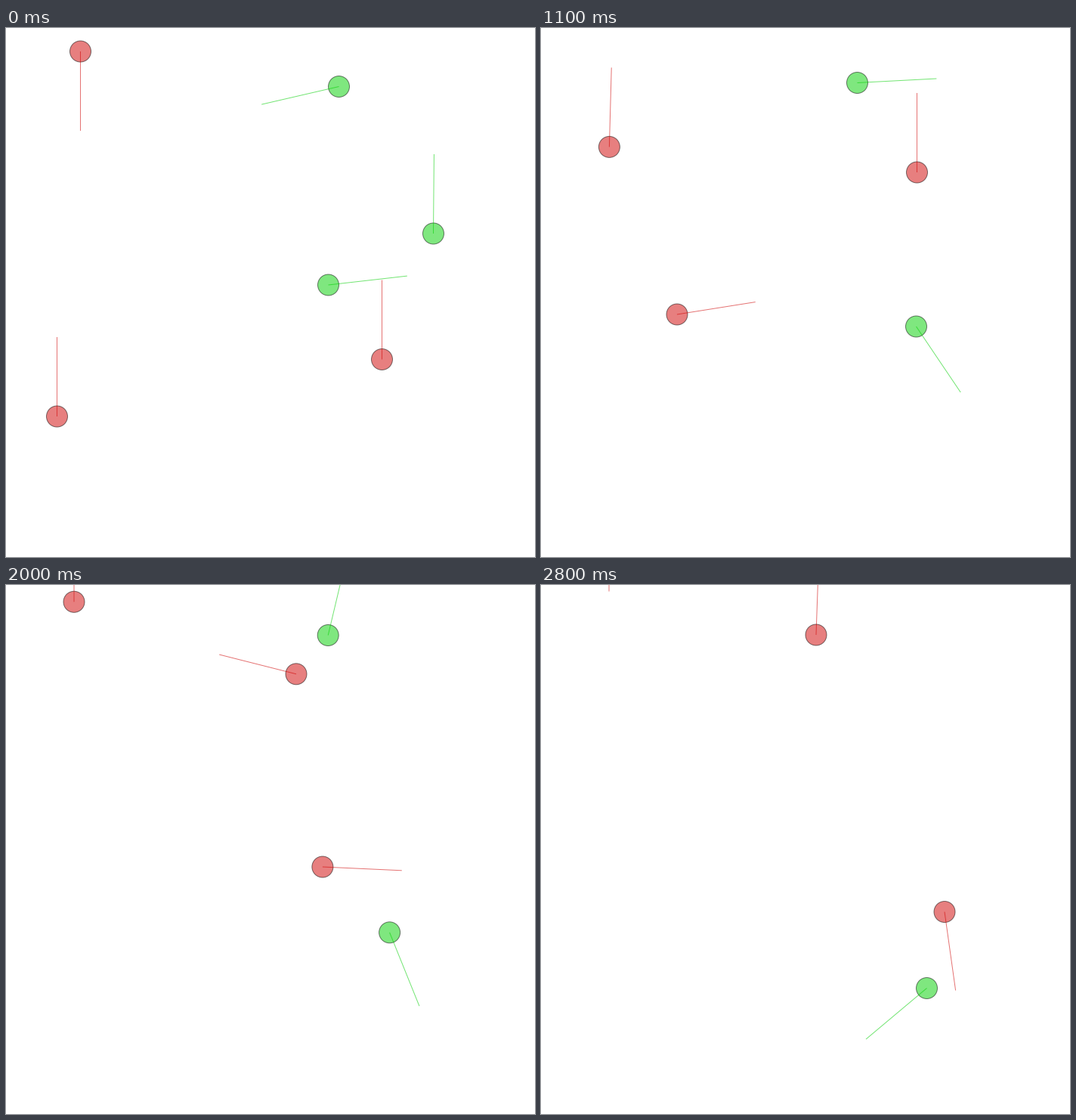
A matplotlib script that plays this animation: 700x700 px, repeating every 2.9 s.

```python
import numpy as np
import matplotlib.pyplot as plt
from matplotlib.animation import FuncAnimation
from matplotlib.colors import to_rgba
from matplotlib.patches import Circle

SIZE, DPI = 700, 100
FRAMES, INTERVAL = 29, 100
RADIUS, REACH = 14, 105
PX = 72 / DPI
RED, GREEN = "#d00000", "#00d000"

fig = plt.figure(figsize=(SIZE / DPI, SIZE / DPI), dpi=DPI, facecolor="white")
ax = fig.add_axes([0, 0, 1, 1])
ax.set_xlim(0, SIZE)
ax.set_ylim(SIZE, 0)
ax.axis("off")


class Walker:
    """A translucent disc with a line showing where it is heading.

    It drifts evenly between key poses (step, x, y, degrees), about-faces
    at each step in `flips` and leaves the stage after step `last`.
    """

    def __init__(self, color, *poses, flips=(), last=FRAMES):
        self.steps, *self.tracks = np.array(poses, dtype=float).T
        self.flips = flips
        self.last = last
        self.disc = ax.add_patch(Circle((0, 0), RADIUS, facecolor=to_rgba(color, 0.5),
                                        edgecolor=to_rgba("black", 0.5),
                                        linewidth=PX, zorder=2))
        self.ray, = ax.plot([], [], color=color, alpha=0.55, linewidth=PX,
                            zorder=3, snap=False, solid_capstyle="butt")

    def update(self, step):
        x, y, heading = (np.interp(step, self.steps, track) for track in self.tracks)
        x, y = x + 0.5, y + 0.5
        heading += 180 * sum(step >= flip for flip in self.flips)
        angle = np.radians(heading)
        self.disc.center = x, y
        self.ray.set_data([x, x + REACH * np.cos(angle)],
                          [y, y + REACH * np.sin(angle)])
        for artist in (self.disc, self.ray):
            artist.set_visible(step <= self.last)
        return self.disc, self.ray


walkers = [
    # paces up and down the left side
    Walker(RED, (0, 98, 30.5, 90), (3, 96, 76, 97), (9, 90, 187, 92),
           (18, 89.5, 51.5, 90), (28, 89.5, -97, 90), flips=(10, 28)),
    # climbs, loops over to the left, then slows
    Walker(RED, (0, 497, 438, -90), (3, 497, 390.5, -90), (11, 497, 190.5, -90),
           (15, 480, 96, -130), (18, 398.5, 122.5, -219), (23, 361, 109.5, -86),
           (28, 363.5, 65.5, -88)),
    # sweeps in an arc from left to right
    Walker(RED, (0, 67, 513.5, -90), (3, 68, 467, -88), (7, 98.5, 404, -43),
           (11, 179.5, 378.5, -9), (23, 498, 370.5, 6.5), (28, 533.5, 432, 82)),
    # spins nearly on the spot, then drifts off
    Walker(GREEN, (0, 440, 77, 167), (3, 430.5, 94.5, 99), (11, 418, 72, 357),
           (18, 422.5, 81, 627), (23, 430.5, 43.5, 668), (25, 437, 30, 668), last=25),
    # sways briefly and leaves
    Walker(GREEN, (0, 565, 271.5, -89.5), (3, 565, 258, -61), (6, 565, 245, -92),
           last=6),
    # wanders right and down
    Walker(GREEN, (0, 426, 339.5, -6.5), (3, 451, 338.5, 3), (7, 483, 359.5, 34),
           (11, 496, 394.5, 56), (18, 507.5, 441.5, 46), (23, 506.5, 486, 101),
           (28, 510, 533, 140)),
]


def draw(step):
    return [artist for walker in walkers for artist in walker.update(step)]


anim = FuncAnimation(fig, draw, frames=FRAMES, interval=INTERVAL,
                     repeat=True, repeat_delay=0, blit=False)
plt.show()
```
